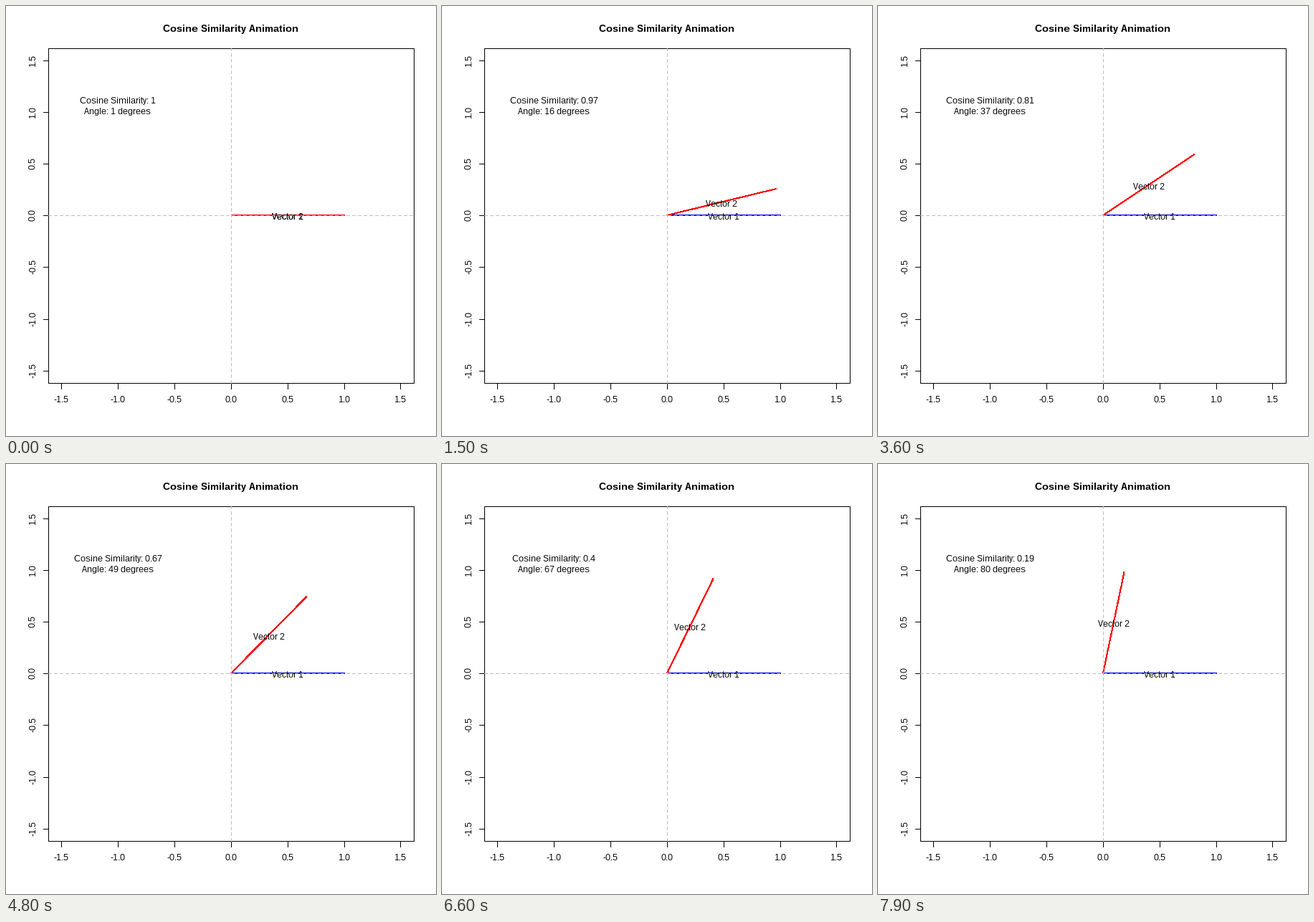
A matplotlib script for the animation above (8000 ms loop, 600 by 600 pixels).

```python
import numpy as np
import matplotlib.pyplot as plt
from matplotlib.animation import FuncAnimation
from matplotlib.patches import Rectangle

SIZE, DPI = 600, 100
PX = 72 / DPI                      # one pixel in points
FRAMES, STEP = 80, 2 * np.pi / 359
LEFT, RIGHT, TOP, BOTTOM = 59, 569, 59, 526

plt.rcParams.update({
    "font.family": "Liberation Sans",
    "text.hinting": "default",
    "text.hinting_factor": 1,
    "axes.unicode_minus": False,
})

fig = plt.figure(figsize=(SIZE / DPI, SIZE / DPI), dpi=DPI, facecolor="white")
ax = fig.add_axes([0, 0, 1, 1])
ax.set_xlim(0, SIZE)
ax.set_ylim(SIZE, 0)
ax.axis("off")


def to_px(x, y):
    """Plot units to whole stage pixels."""
    return np.floor(314.4 + 157.63 * x), np.floor(292.8 - 144.3 * y)


ORIGIN = to_px(0, 0)


def line(xs, ys, color="black", **kw):
    """Hard-edged one pixel line; whole coordinates snap to pixel centres."""
    return ax.plot(xs, ys, color=color, lw=PX, antialiased=False,
                   solid_capstyle="butt", **kw)[0]


def label(x, y, text="", size=12, **kw):
    kw = {"ha": "center", "va": "baseline", "zorder": 5} | kw
    return ax.text(x, y, text, fontsize=size * PX, **kw)


def vector(color, zorder):
    # Unsnapped, so the hard-edged stroke fills two pixels
    return line([], [], color, zorder=zorder, snap=False)


def aim(vec, x, y):
    tip = to_px(x, y)
    vec.set_data([ORIGIN[0], tip[0] + .5], [ORIGIN[1], tip[1]])


def name_pos(x, y):
    px, py = to_px(x / 2, y / 2)
    return px, py + 6


# Frame, ticks and title
ax.add_patch(Rectangle((LEFT, TOP), RIGHT - LEFT, BOTTOM - TOP, fill=False,
                       lw=PX, ec="black", antialiased=False, zorder=4))
for v in np.arange(-1.5, 1.6, 0.5):
    x, y = to_px(v, v)
    line([x, x], [BOTTOM, BOTTOM + 8])
    line([LEFT - 7, LEFT], [y, y])
    label(x, 553, f"{v:.1f}")
    label(43, y - .5, f"{v:.1f}", rotation=90, ha="right", va="center")
label(313.5, 36, "Cosine Similarity Animation", 14, weight="bold")

# Dashed zero lines lie over everything else
for xs, ys in (([LEFT, RIGHT], [ORIGIN[1]] * 2), ([ORIGIN[0]] * 2, [BOTTOM, TOP])):
    line(xs, ys, "#bebebe", zorder=6, dashes=(5, 3), dash_capstyle="butt")

aim(vector("blue", 1), 1, 0)
vec2 = vector("red", 2)
label(*name_pos(1, 0), "Vector 1")
name2 = label(0, 0, "Vector 2")
cosine = label(156.2, 136)
degrees = label(155.5, 151)


def update(i):
    c, s = np.cos(i * STEP), np.sin(i * STEP)
    aim(vec2, c, s)
    name2.set_position(name_pos(c, s))
    cosine.set_text(f"Cosine Similarity: {round(c, 2):g}")
    degrees.set_text(f"Angle: {i + 1} degrees")
    return vec2, name2, cosine, degrees


anim = FuncAnimation(fig, update, frames=FRAMES, interval=100,
                     repeat=True, repeat_delay=0, blit=False)
plt.show()
```
